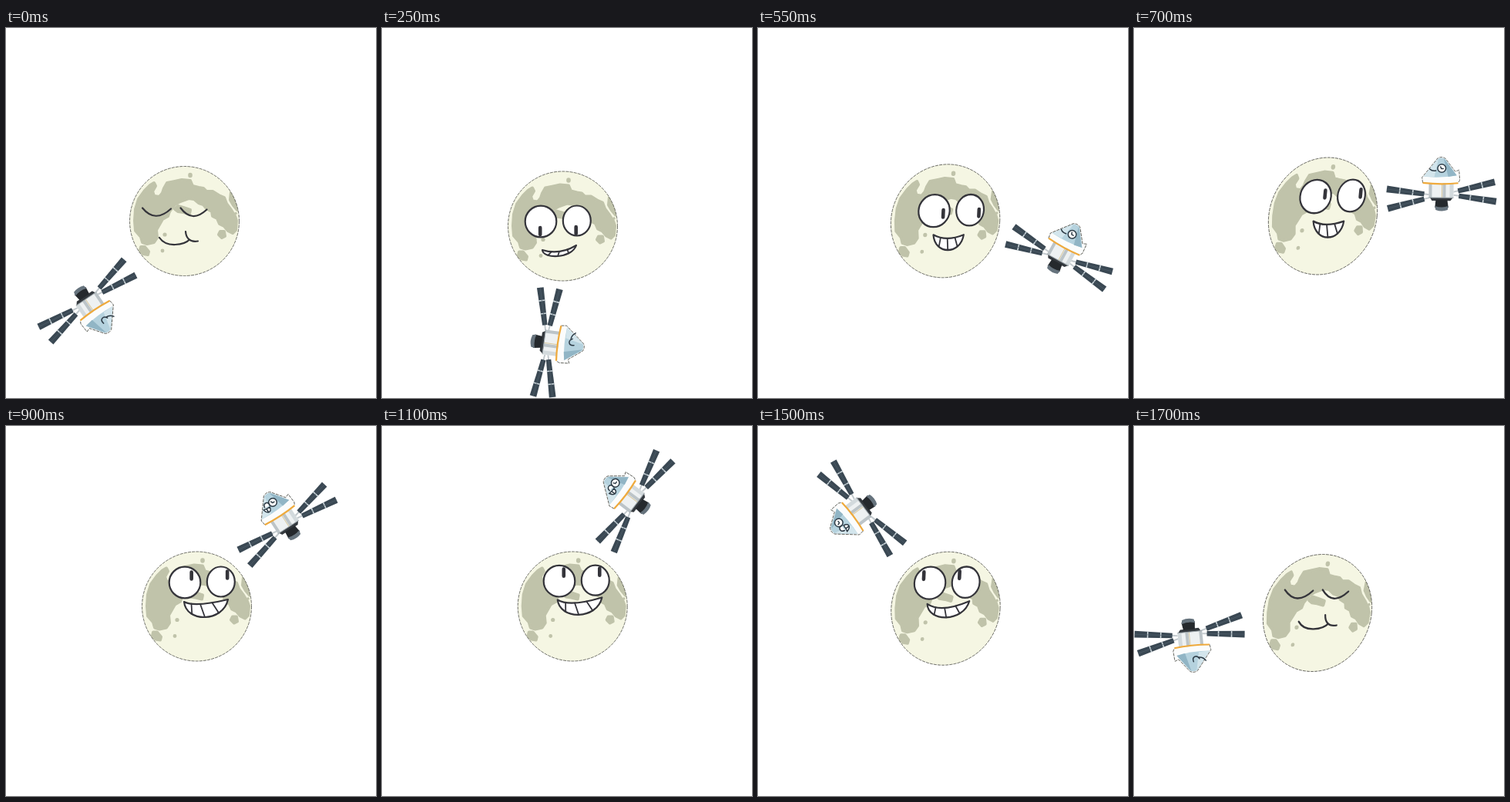
Animation of 480x480 px, one loop 1800 ms. Source, as an HTML page:

```html
<!DOCTYPE html>
<html lang="en">
<head>
<meta charset="utf-8">
<title>Moon and spacecraft</title>
<style>
html, body { margin: 0; width: 100%; height: 100%; overflow: hidden; background: #fff; }
svg { display: block; width: 100vw; height: 100vh; }
.ink { fill: none; stroke: #34343a; stroke-width: 2.2; stroke-linecap: round; stroke-linejoin: round; }
.white { fill: #fff; }
.mare { fill: #c0c3aa; stroke: #c0c3aa; stroke-width: 4; stroke-linejoin: round; }
.edge { fill: none; stroke: #4c4d46; stroke-width: .8; stroke-dasharray: 4 1.2; }
.thin { fill: none; stroke: #2c3a45; stroke-width: 1.5; stroke-linecap: round; }
</style>
</head>
<body>
<svg viewBox="0 0 480 480">
  <defs>
    <clipPath id="disc"><circle r="71"/></clipPath>
    <g id="wing">
      <path d="M-3 0H6" stroke="#c3cace" stroke-width="2"/>
      <path d="M4 -3.2L53 -4.4V4.4L4 3.2Z" fill="#3a4853"/>
      <path d="M19 -4V4M36 -4.3V4.3" stroke="#c9d3d8" stroke-width="1.6"/>
      <path d="M4 0H53" stroke="#52626e" stroke-width=".6"/>
    </g>
  </defs>

  <g id="moon">
    <circle r="71" fill="#f5f6e3"/>
    <g clip-path="url(#disc)">
      <g class="mare" transform="translate(-231.5 -250.5)">
        <path d="M187 204L192 201L194 205L190 212L192 218L199 219L203 214L205 208L209 201L219 199L228 197L239 198L242 205L250 207L256 208L260 212L268 212L276 217L283 220L286 228L292 236L297 244L299 250L298 262L294 266L288 263L283 257L277 254L274 247L268 244L267 238L260 234L256 229L250 227L244 222L237 221L226 225L219 229L212 238L210 244L203 248L199 255L195 262L196 272L192 278L183 280L177 278L175 271L168 263L167 250L168 235L172 222L180 211Z"/>
        <path d="M223 231L230 233L239 236L238 241L230 239L223 238L219 235Z"/>
        <path d="M278 264L283 264L284 270L280 272L276 268Z"/>
        <path d="M175 284L180 284L185 290L184 294L178 293L174 289Z"/>
        <path d="M292 213L298 222L300 236L295 230L291 223Z"/>
      </g>
      <g fill="#c0c3aa">
        <ellipse cx="7.5" cy="-59.5" rx="2.8" ry="3.2"/>
        <circle cx="-28.500" cy="38.500" r="2.400"/>
        <circle cx="-25.500" cy="17.500" r="2.600"/>
        <circle cx="66.500" cy="-10" r="1.800"/>
      </g>
    </g>
    <circle class="edge" r="71"/>
    <g id="face">
      <g id="asleep" class="ink">
        <path d="M-18.500 0Q-2 20 18.500 1M31 0Q46 20 65 2"/>
        <path d="M3.500 38.500Q10 48 24 47.500Q37 47 42.500 41M37.500 30.500C38 38 42 45 53.500 43"/>
      </g>
      <g id="awake" class="ink">
        <g id="eyes">
          <circle class="white" r="20.300"/>
          <ellipse class="white" cx="46.800" cy="-1" rx="18" ry="19.500"/>
          <path id="pupils" d="M0 -4.500V4.500M46.500 -5.500V3.500" stroke-width="4.600"/>
        </g>
        <path id="mouth" class="white"/>
        <path id="teeth" stroke-width="1.800"/>
      </g>
    </g>
  </g>

  <g id="ship">
    <use href="#wing" transform="translate(-18 13) rotate(187)"/>
    <use href="#wing" transform="translate(-18 18) rotate(165)"/>
    <use href="#wing" transform="translate(18 9) rotate(-14)"/>
    <use href="#wing" transform="translate(19 14) rotate(8)"/>
    <path d="M-15 16H16L12 21H-12Z" fill="#34393e"/>
    <path d="M-7 20H8L9.500 30H-8Z" fill="#25292d"/>
    <path d="M-8 28Q1 31 9.500 28L8.500 33Q1 36 -7 33Z" fill="#66737d"/>
    <path d="M-16 -2H16V17H-16Z" fill="#eef1f2"/>
    <path d="M-16 -2H-12V17H-16ZM2 -2H6V17H2Z" fill="#bcc4c8"/>
    <path d="M11 -2H16V17H11Z" fill="#d3dadd"/>
    <path d="M1 -1V17" stroke="#d8c9a0"/>
    <path d="M-16 17H16" stroke="#9aa3a8"/>
    <path d="M-25 -9L-5 -34Q0 -37 5 -34L18 -17L23 -19L24 -6L22 -2H-24Z" fill="#fbfcfc"/>
    <path d="M-23 -10L-5 -33Q0 -36 5 -33L20 -12Q0 -8 -23 -10Z" fill="#b5d2de"/>
    <path d="M-4 -33L-9 -10L-23 -10Z" fill="#d3e5ec"/>
    <path d="M3 -34L20 -12L9 -10Z" fill="#91b5c5"/>
    <path class="edge" d="M-24 -2L-25 -9L-5 -34Q0 -37 5 -34L18 -17L23 -19L24 -6L22 -2"/>
    <path d="M-24 -2Q0 .5 22 -2" fill="none" stroke="#efaa3c" stroke-width="2.200"/>
    <g id="crew">
      <path id="doze" class="thin" d="M-1 -22C1 -15 -6 -13 -9 -19M-8 -17Q-14 -17 -17 -22"/>
      <g id="look">
        <circle cx=".5" cy="-21" r="5.300" fill="#fff" class="thin" style="fill:#fff"/>
        <path class="thin" d="M0 -20.500L-1 -23M0 -20.500H2.500"/>
        <path id="smile" class="thin" d="M-15 -20Q-12 -17 -7 -18"/>
        <g id="grin">
          <path class="thin" style="fill:#fff" d="M-15 -19Q-10 -18 -6 -18Q-7 -12 -11 -13Q-14 -14 -15 -19ZM-11 -18V-13.500"/>
          <path class="thin" style="fill:#fff" d="M-12 -21Q-11 -26 -7 -25Q-4 -24 -5 -20"/>
        </g>
      </g>
    </g>
  </g>
</svg>
<script>
const LOOP = 1800, STEP = 50;
const $ = id => document.getElementById(id);
const show = (id, on) => $(id).setAttribute('display', on ? 'inline' : 'none');
const move = (id, value) => $(id).setAttribute('transform', value);
const clamp = (v, lo = 0, hi = 1) => Math.min(hi, Math.max(lo, v));

// time, orbit angle, orbit radius, ship turn, crew shift, moon x, moon y, stretch, face x, face y
const poses = [
  [50, 135, 176, 146, 0, 231.5, 250.5, 0, -36, -17],
  [250, 93.7, 169, 98, 0, 234.5, 257, 0, -28.5, -6],
  [400, 49.4, 166, 60, 0, 240.5, 255, 0, -21.5, -5],
  [700, -13.3, 165, 0.5, 0, 245, 244, 1, -11.9, -23.8],
  [900, -46.2, 172, -33, 0, 247.5, 234, 0, -15.5, -31],
  [1300, -80.5, 170, -75, 6, 246.5, 234, 0, -19, -33.5],
  [1700, -194.7, 169.5, -186, 0, 238, 242.5, 1, -27, -28]
];
const turn = [LOOP, -360, 0, -360, 0, 0, 0, 0, 0, 0];

// time, then mouth corners and middles: left, top, right, bottom
const mouths = [
  [250, 2, 37, 24, 39, 46, 31, 22, 45],
  [400, 1, 30, 21, 35, 40, 30, 20, 48],
  [700, 0, 30, 18, 34, 40, 30, 21, 49.5],
  [900, -1, 25, 20, 28, 56, 22, 26, 45],
  [1300, -3, 24, 20, 29, 54, 21, 24, 43]
];
const still = [LOOP, 0, 0, 0, 0, 0, 0, 0, 0];

// Smooth periodic curve through the rows, without overshoot.
function sample(rows, shift, t) {
  const n = rows.length;
  const row = i => {
    const laps = Math.floor(i / n);
    return rows[i - laps * n].map((v, c) => v + laps * shift[c]);
  };
  let i = -1;
  while (row(i + 1)[0] <= t) i++;
  const [p, a, b, q] = [row(i - 1), row(i), row(i + 1), row(i + 2)];
  const h = b[0] - a[0], u = (t - a[0]) / h;
  return a.map((v, c) => {
    const slope = (m, k) => (k[c] - m[c]) / (k[0] - m[0]);
    const blend = (x, y) => x * y > 0 ? 2 * x * y / (x + y) : 0;
    const mid = slope(a, b);
    const s0 = blend(slope(p, a), mid), s1 = blend(mid, slope(b, q));
    const w = u * u * (3 - 2 * u);
    return v + (b[c] - v) * w + h * u * (1 - u) * (s0 * (1 - u) - s1 * u);
  });
}

function drawMouth(t) {
  const [, lx, ly, tx, ty, rx, ry, bx, by] = sample(mouths, still, t);
  const cx = 2 * tx - (lx + rx) / 2, cy = 2 * ty - (ly + ry) / 2;
  const low = (by - (ly + ry) / 8) / 0.75;
  const lean = (bx - (lx + rx) / 2) / 0.75, pad = (rx - lx) * 0.08;
  const r2 = rx - pad + lean, l2 = lx + pad + lean;
  $('mouth').setAttribute('d',
    `M${lx} ${ly}Q${cx} ${cy} ${rx} ${ry}C${r2} ${low} ${l2} ${low} ${lx} ${ly}Z`);

  const quad = (k, a, b, c) => a * (1 - k) ** 2 + 2 * b * k * (1 - k) + c * k * k;
  const cubic = (k, a, b, c, d) => quad(k, a, b, c) * (1 - k) + quad(k, b, c, d) * k;
  $('teeth').setAttribute('d', [0.27, 0.5, 0.74].map(k =>
    `M${quad(k, lx, cx, rx)} ${quad(k, ly, cy, ry)}` +
    `L${cubic(k, lx, l2, r2, rx)} ${cubic(k, ly, low, low, ry)}`).join(''));
}

function draw(t) {
  const [, angle, radius, tilt, crew, mx, my, s, fx, fy] = sample(poses, turn, t);
  const rad = angle * Math.PI / 180, dx = Math.cos(rad), dy = Math.sin(rad);

  move('ship', `translate(${238 + radius * dx} ${241 + radius * dy}) rotate(${tilt})`);
  move('crew', `translate(${crew} 0)`);
  const alert = t > 250 && t < 1600;
  show('doze', !alert);
  show('look', alert);
  show('smile', t < 850);
  show('grin', t >= 850);

  move('moon', `matrix(${1 - 0.01 * s} 0 ${-0.1 * s} ${1 + 0.07 * s} ${mx} ${my})`);
  move('face', `translate(${fx} ${fy})`);
  const open = clamp((t - 100) / 100) * clamp((1600 - t) / 100);
  show('asleep', open < 0.3);
  show('awake', open >= 0.3);
  move('eyes', `scale(1 ${Math.max(open, 0.1)})`);
  move('pupils', `translate(${12.5 * dx} ${12.5 * dy})`);
  drawMouth(t);
}

function tick() {
  const t = performance.now() % LOOP;
  draw(clamp(Math.floor(t / STEP) * STEP, 50, 1700));
  requestAnimationFrame(tick);
}
tick();
</script>
</body>
</html>
```
